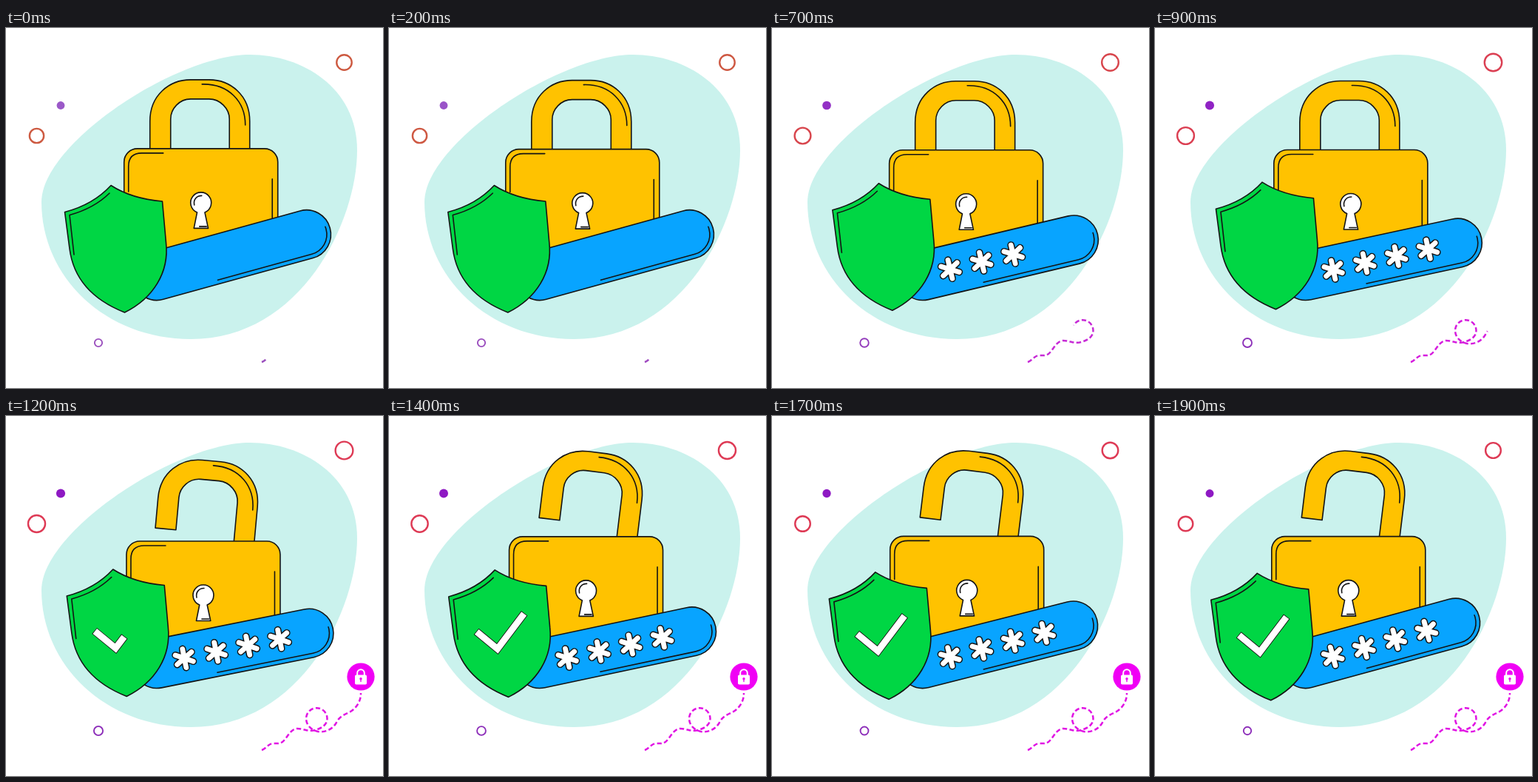
An HTML page with a canvas that plays this animation: 510x486 px, repeating every 2000 ms.

```html
<!DOCTYPE html>
<html lang="en">
<head>
<meta charset="utf-8">
<title>Password lock</title>
<style>
html, body { margin: 0; width: 100%; height: 100%; overflow: hidden; background: #fff; }
canvas { display: block; }
</style>
</head>
<body>
<canvas id="stage" width="510" height="486"></canvas>
<script>
const ctx = document.getElementById('stage').getContext('2d');
const LOOP = 2000, STEP = 100;
const INK = '#141414', GOLD = '#ffc200', GREEN = '#00d644', BLUE = '#08a4ff',
      MINT = '#caf2ed', MAGENTA = '#f000f5';

// Shapes of the lock are relative to the top left corner of its body.
const blob = new Path2D('M330 36C400 36 475 80 475 165C475 260 400 420 250 420C134 420 48 336 48 235C48 156 230 36 330 36Z');
const shield = new Path2D('M142 212.5Q170 230.5 211.5 234L216.5 290C221 330 199 365 160.5 384C125 370 92 345 86 298L79.5 248.5Q118 238.5 142 212.5Z');
const shieldShine = new Path2D('M140 223Q119 243.5 86 252.5L92 306');
const bodyShine = new Path2D('M6 58V24Q6 6 24 6H53M200.5 41V103');
const keyhole = new Path2D('M98.8 86A14 14 0 1 1 109.2 86L113.8 107.5H94.5Z');
const keyholeShine = new Path2D('M95 76C93.5 69 98 63.5 105 63.5M102 105H111.5');
const shackle = new Path2D('M0 0V-41C0 -76 26 -97 55 -97H80C109 -97 135 -76 135 -41V24H107.5V-44C107.5 -58 95 -71 80 -71H55C40 -71 28 -58 28 -44V0Z');
const shackleShine = new Path2D('M70.5 -91C106 -92 129 -68 129 -36');
const trailData = 'M346 451C352 449 355 442 362 442C368 442 372 443 377 437C382 431 386 422 394 422C403 422 407 426 416 424.5C427 422 434.5 417 434.5 408.5A14.2 14.2 0 0 0 406 408.5C406 416 412 424 422 426C434 427.5 443 422 448 412C453 403 463 402 469 397C476 391 480 384 480 374';
const trail = new Path2D(trailData);
const trailShape = document.createElementNS('http://www.w3.org/2000/svg', 'path');
trailShape.setAttribute('d', trailData);
const trailLength = trailShape.getTotalLength();

const rad = deg => deg * Math.PI / 180;
const clamp = v => Math.min(1, Math.max(0, v));
const ramp = (t, from, to) => clamp((t - from) / (to - from));
const wave = (t, peak, period) => Math.cos(2 * Math.PI * (t - peak) / period);

function ease(t, from, to) {
  const k = ramp(t, from, to);
  return k * k * (3 - 2 * k);
}

// Rises until the lock opens, then falls back.
const swing = t => ease(t, 200, 1200) - ease(t, 1200, 1980);

function warm(t, from, to) {
  const k = ease(t, 0, 1200);
  return `rgb(${from.map((v, i) => Math.round(v + (to[i] - v) * k))})`;
}

function placed(x, y, angle, draw) {
  ctx.save();
  ctx.translate(x, y);
  ctx.rotate(rad(angle));
  draw();
  ctx.restore();
}

function line(path, color = INK, width = 1.6) {
  ctx.strokeStyle = color;
  ctx.lineWidth = width;
  ctx.stroke(path);
}

function shape(path, fill) {
  ctx.fillStyle = fill;
  ctx.fill(path);
  line(path);
}

function circle(x, y, r) {
  const p = new Path2D();
  p.arc(x, y, r, 0, Math.PI * 2);
  return p;
}

function box(x, y, w, h, r) {
  const p = new Path2D();
  p.roundRect(x, y, w, h, r);
  return p;
}

function disc(x, y, r, color) {
  ctx.fillStyle = color;
  ctx.fill(circle(x, y, r));
}

function drawDecor(t) {
  const grow = .5 + .5 * wave(t, 1100, LOOP);
  const red = warm(t, [205, 90, 65], [222, 58, 85]);
  line(circle(457.5, 46.5, 10.2 + 1.7 * grow), red, 2.4);
  line(circle(41.5, 145.5, 9.6 + 2 * grow), red, 2.4);
  line(circle(125, 425, 5.1 + grow), warm(t, [155, 80, 190], [140, 45, 185]), 1.9);
  disc(74, 104.5, 5.4 + .7 * grow, warm(t, [155, 89, 200], [142, 25, 195]));
}

function drawLock(t) {
  const x = 160 + 3 * wave(t, 1250, 1700);
  const jolt = 5.4 * Math.sin(Math.PI * ramp(t, 1000, 1400));
  const y = 163.6 + 1.2 * wave(t, 700, LOOP) + jolt;
  const open = ease(t, 1000, 1300);
  placed(x, y, 0, () => {
    placed(35 + 5.5 * open, 4 - 29.5 * open, 7 * open, () => {
      shape(shackle, GOLD);
      line(shackleShine);
    });
    shape(box(0, 0, 208, 160, 18), GOLD);
    line(bodyShine);
    shape(keyhole, '#fff');
    line(keyholeShine);
  });
}

function drawStar(x, scale) {
  if (!scale) return;
  const arms = new Path2D();
  for (let i = 0; i < 6; i++) {
    const a = rad(i * 60 + 90);
    arms.moveTo(0, 0);
    arms.lineTo(12.8 * Math.cos(a), 12.8 * Math.sin(a));
  }
  placed(x, 0, 0, () => {
    ctx.scale(scale, scale);
    line(arms, INK, 9.8);
    line(arms, '#fff', 6.8);
  });
}

function drawBar(t) {
  placed(204, 334.5, 4.1 * swing(t) - 15.4, () => {
    shape(box(-33, -33, 276, 66, 33), BLUE);
    const shine = new Path2D();
    shine.moveTo(78, 27.5);
    shine.arc(210, 0, 27.5, rad(90), rad(-7), true);
    line(shine);
    for (let i = 0; i < 4; i++) drawStar(38 + 43.8 * i, ramp(t - 150 * i, 250, 400));
  });
}

function drawCheck(progress) {
  if (!progress) return;
  const short = 36.2, long = 59.6, end = (short + long) * progress;
  const spot = d => d < short
    ? [117.5 + 28 * d / short, 296 + 23 * d / short]
    : [145.5 + 36 * (d - short) / long, 319 - 47.5 * (d - short) / long];
  const part = (from, to) => {
    const p = new Path2D();
    p.moveTo(...spot(from));
    if (to > short) p.lineTo(...spot(short));
    p.lineTo(...spot(to));
    return p;
  };
  ctx.lineCap = 'butt';
  ctx.lineJoin = 'miter';
  line(part(-.8, end + .8), INK, 10.6);
  line(part(0, end), '#fff', 8.8);
}

function drawShield(t) {
  const x = 3 * ease(t, 0, 1000) - 7 * ease(t, 1100, LOOP);
  placed(x, -5.5 * swing(t), 0, () => {
    shape(shield, GREEN);
    line(shieldShine);
    drawCheck(ramp(t, 1035, 1320));
  });
}

function drawTrail(t) {
  const shown = trailLength * (.03 + .97 * ease(t, 150, 1200));
  const dashes = [];
  for (let d = 0; d < shown; d += 9.6) dashes.push(Math.min(6.2, shown - d), 3.4);
  dashes[dashes.length - 1] = trailLength;
  ctx.save();
  ctx.lineCap = 'butt';
  ctx.setLineDash(dashes);
  line(trail, warm(t, [155, 80, 190], [225, 20, 228]), 2.5);
  ctx.restore();
}

function drawBadge(t) {
  const scale = ramp(t, 1050, 1200);
  if (!scale) return;
  placed(480, 352, 0, () => {
    ctx.scale(scale, scale);
    disc(0, 0, 18.6, MAGENTA);
    ctx.fillStyle = '#fff';
    ctx.fill(box(-8, -2.5, 16, 13, 1.8));
    line(new Path2D('M-4.8 -2V-5A4.8 4.8 0 0 1 4.8 -5V-2'), '#fff', 2);
    disc(0, 2.8, 1.7, MAGENTA);
    line(new Path2D('M0 3V6.5'), MAGENTA, 1.4);
  });
}

function render(t) {
  ctx.fillStyle = '#fff';
  ctx.fillRect(0, 0, 510, 486);
  ctx.lineCap = ctx.lineJoin = 'round';
  ctx.fillStyle = MINT;
  ctx.fill(blob);
  for (const draw of [drawDecor, drawLock, drawBar, drawShield, drawTrail, drawBadge]) draw(t);
}

const begin = performance.now();
function tick() {
  const t = (performance.now() - begin) % LOOP;
  render(Math.floor(t / STEP) * STEP);
  requestAnimationFrame(tick);
}
tick();
</script>
</body>
</html>
```
